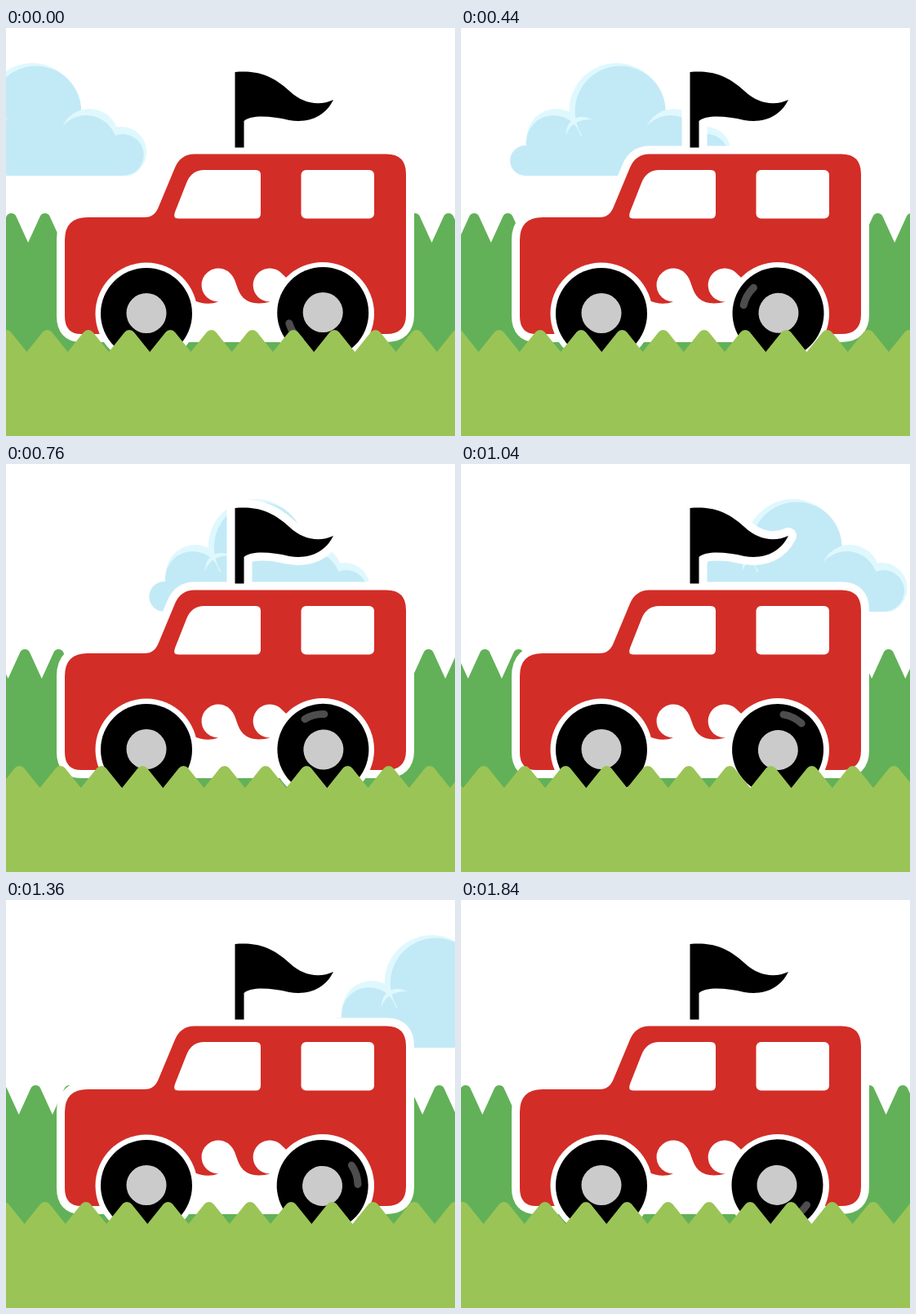
Animation, 550 px wide and 500 px high, one loop 1880 ms. Source, as an HTML page with a canvas:

```html
<!DOCTYPE html>
<html lang="en">
<head>
<meta charset="utf-8">
<title>Red car</title>
<style>
  html, body { margin: 0; width: 100%; height: 100%; overflow: hidden; background: #fff; }
  canvas { display: block; }
</style>
</head>
<body>
<canvas id="stage" width="550" height="500"></canvas>
<script>
const ctx = document.getElementById('stage').getContext('2d');
const LOOP = 1880, STEP = 40;
const WHITE = '#fff', RED = '#d32d27', BLACK = '#000', HUB = '#cbcbcb', SHINE = '#4d4d4d';
const SKY = '#c2eaf6', PALE = '#dff8fe', NEAR = '#9bc456', FAR = '#62b158';

const body = new Path2D(`M92 375 Q72 375 72 353 V260 Q72 232 100 232 H170 Q182 232 187 219
  L207 171 Q214 154.500 231 154.500 H466 Q490 154.500 490 179 V351 Q490 375 466 375 Z`);
const frontWindow = new Path2D(`M243 174 H306 Q312 174 312 180 V227.500 Q312 233.500 306 233.500
  H211 Q204 233.500 207 225.500 L221 190 Q227 174 243 174 Z`);
const rearWindow = new Path2D();
rearWindow.roundRect(361.5, 174, 89.5, 59.5, 6);
const underside = new Path2D(`M228 376 V333 Q245 341 260 335.500 A20.500 20.500 0 1 1 275 301
  C283 309 282 322 291 331 Q302 341 324 335.500 A20.500 20.500 0 1 1 339 302 L388 349 V376 Z`);
const flag = new Path2D(`M280.500 54 C305 52 324 56 347 77 C364 93 384 96 401 88
  C391 108 372 117 347 113 C325 108 301 106 291.500 114 V146.500 H280.500 Z`);
const curl = new Path2D('M71 131 C71 115 84 103 103 112 C87 112 76 117 71 131 Z');

function fill(path, color) {
  ctx.fillStyle = color;
  ctx.fill(path);
}

function disc(x, y, r, color) {
  ctx.fillStyle = color;
  ctx.beginPath();
  ctx.arc(x, y, r, 0, 7);
  ctx.fill();
}

function halo(path) {
  ctx.strokeStyle = WHITE;
  ctx.lineWidth = 20;
  ctx.lineJoin = 'round';
  ctx.stroke(path);
}

function cloud(x) {
  ctx.save();
  ctx.translate(x, 0);
  disc(59, 135, 36, PALE);
  disc(133, 101, 58, PALE);
  disc(21, 162.5, 18.5, SKY);
  disc(56, 141, 34, SKY);
  disc(137.5, 102, 55.5, SKY);
  fill(curl, PALE);
  disc(203, 135, 36, PALE);
  disc(242, 152, 31, PALE);
  disc(199, 143, 38 - 2, SKY);
  disc(199, 145, 38, SKY);
  disc(244, 155.5, 25.5, SKY);
  ctx.clearRect(150, 181, 130, 10);
  ctx.fillRect(40, 132, 193, 49);
  ctx.fillRect(21, 162, 223, 19);
  ctx.restore();
}

// Row of rounded blades; first is the x of any one tip.
function grass(first, period, valley, slope, r, bottom, color) {
  const half = period / 2, tip = valley - half * slope;
  ctx.fillStyle = color;
  ctx.beginPath();
  ctx.moveTo(-period * 2, bottom);
  for (let x = first % period - period; x < 550 + period; x += period) {
    ctx.lineTo(x - half, valley);
    ctx.arcTo(x, tip, x + half, valley, r);
    ctx.lineTo(x + half, valley);
  }
  ctx.lineTo(550 + period * 2, bottom);
  ctx.fill();
}

function rearWheel(turn) {
  ctx.save();
  ctx.translate(388, 349.5);
  ctx.rotate(turn);
  disc(.2, -.5, 56, BLACK);
  disc(.2, -1, 24.5, HUB);
  ctx.strokeStyle = SHINE;
  ctx.lineWidth = 9;
  ctx.lineCap = 'round';
  ctx.beginPath();
  ctx.arc(0, 0, 43, 2.27, 2.85);
  ctx.stroke();
  ctx.restore();
}

function car(turn) {
  halo(flag);
  halo(body);
  disc(172, 350, 62.5, WHITE);
  disc(388, 350, 63, WHITE);
  fill(body, RED);
  for (const p of [frontWindow, rearWindow, underside]) fill(p, WHITE);
  disc(172, 350, 62.5, WHITE);
  disc(388, 350, 63, WHITE);
  disc(172, 350, 56, BLACK);
  disc(172, 349.5, 24.5, HUB);
  rearWheel(turn);
  fill(flag, BLACK);
}

function draw(now) {
  const t = Math.floor(now % LOOP / STEP) * STEP;
  ctx.fillStyle = WHITE;
  ctx.fillRect(0, 0, 550, 500);
  cloud(t * .36 - 100.8);
  grass(6.5 + t / LOOP * 41.2, 41.2, 263, 2.2, 6.6, 420, FAR);
  car(t / LOOP * Math.PI * 1.5);
  grass(.3 + t * .2196, 50.25, 397, 1.25, 7.3, 500, NEAR);
  requestAnimationFrame(draw);
}
requestAnimationFrame(draw);
</script>
</body>
</html>
```
